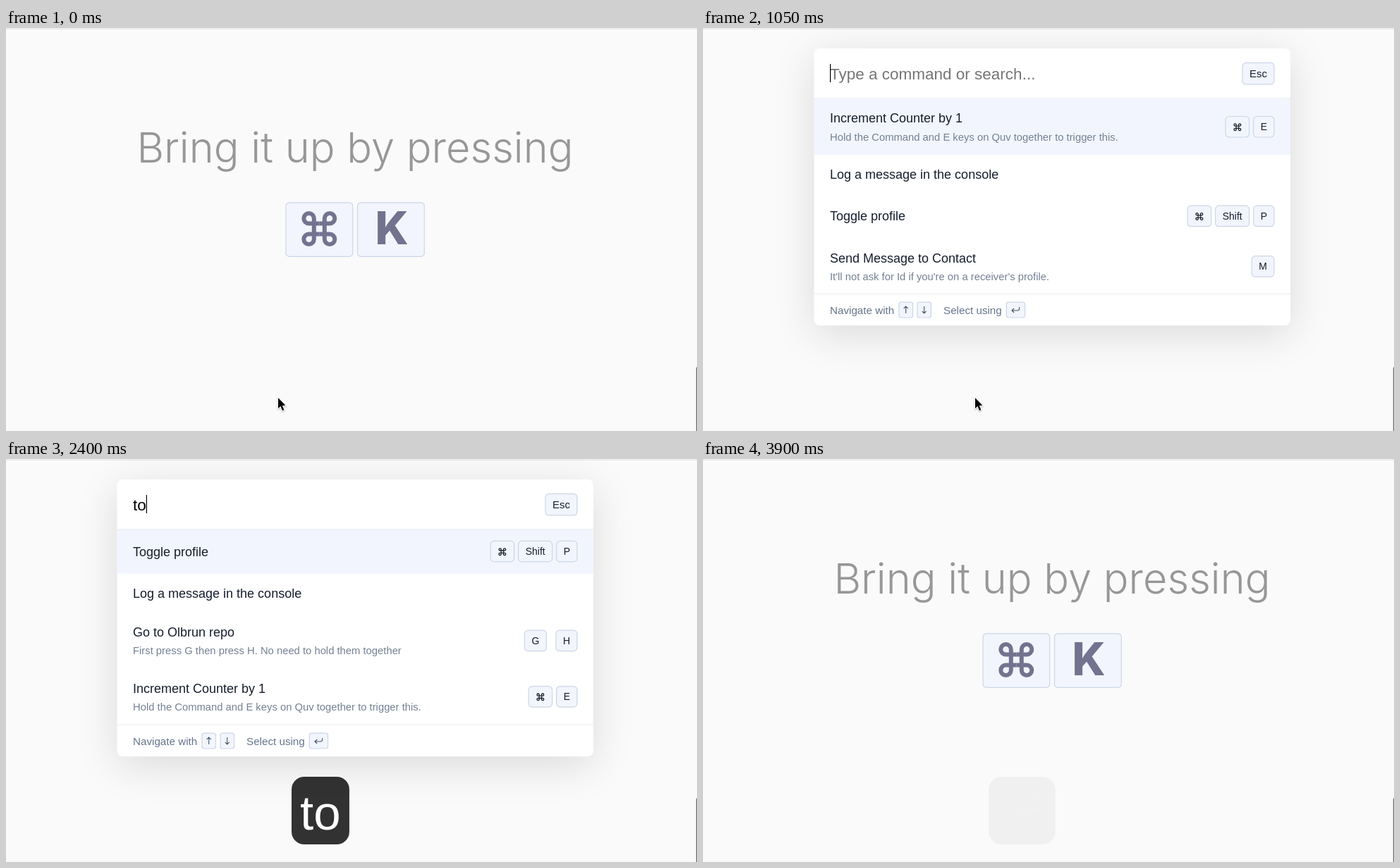
An HTML page with a canvas that plays this animation: 980 px wide and 572 px high, repeating every 4.12 s.

```html
<!DOCTYPE html>
<html lang="en">
<head>
<meta charset="utf-8">
<title>Command palette</title>
<style>
html, body { margin: 0; width: 100%; height: 100%; overflow: hidden; background: #fafafa; }
canvas { display: block; width: 980px; height: 572px; }
</style>
</head>
<body>
<canvas id="stage"></canvas>
<script>
const W = 980, H = 572, LOOP = 4120, STEP = 50;
const SANS = '"Liberation Sans", Arial, sans-serif';
const INTER = 'Inter, "Open Sans", sans-serif';
const INK = '#161d2d', KEY = '#f2f5fd', EDGE = '#ccd6e7', MUTED = '#64748b';
const dpr = window.devicePixelRatio || 1;

function setup(canvas) {
  canvas.width = W * dpr;
  canvas.height = H * dpr;
  const c = canvas.getContext('2d');
  c.scale(dpr, dpr);
  return c;
}
const stage = setup(document.getElementById('stage'));
const layer = document.createElement('canvas');
const pane = setup(layer);

// ---- drawing helpers ----
function box(c, x, y, w, h, r, fill, line) {
  c.beginPath();
  c.roundRect(x, y, w, h, r);
  c.fillStyle = fill;
  c.fill();
  if (line) {
    c.strokeStyle = line;
    c.lineWidth = 1.2;
    c.stroke();
  }
}

// y is the middle of the capital letters
function label(c, str, x, y, size, color, align = 'left', font = SANS, weight = 400) {
  c.font = `${weight} ${size}px ${font}`;
  c.textAlign = align;
  c.fillStyle = color;
  c.fillText(str, x, y + size * 0.36);
}

function poly(c, points, fill) {
  c.beginPath();
  points.forEach(([x, y]) => c.lineTo(x, y));
  c.closePath();
  c.fillStyle = fill;
  c.fill();
}

function command(c, x, y, size, lw, color) {
  const half = (size - lw) / 2, s = half * 0.34, r = (half - s) / 2;
  c.strokeStyle = color;
  c.lineWidth = lw;
  for (const [sx, sy] of [[1, 1], [-1, 1], [1, -1], [-1, -1]]) {
    c.save();
    c.translate(x, y);
    c.scale(sx, sy);
    c.beginPath();
    c.moveTo(s, 0);
    c.lineTo(s, s + r);
    c.arc(s + r, s + r, r, Math.PI, -Math.PI / 2, true);
    c.lineTo(0, s);
    c.stroke();
    c.restore();
  }
}

// right-aligned key cap, returns its left edge
function keycap(c, name, right, mid, h = 29.5, size = 14) {
  c.font = `400 ${size}px ${SANS}`;
  const w = name === 'cmd' ? 33.5 : c.measureText(name).width + 20;
  box(c, right - w, mid - h / 2, w, h, 5, KEY, EDGE);
  if (name === 'cmd') command(c, right - w / 2, mid + 0.5, 11, 1.3, INK);
  else label(c, name, right - w / 2, mid, size, INK, 'center');
  return right - w;
}

// ---- page behind the palette ----
function drawPage(c) {
  c.fillStyle = '#fafafa';
  c.fillRect(0, 0, W, H);
  c.fillStyle = '#f3f3f3';
  c.fillRect(0, 0, W, 1);
  c.fillStyle = '#e6e6e6';
  c.fillRect(0, 1, W, 1);
  box(c, 978.8, 480, 20, 120, 4, '#6c6c6c');
  label(c, 'Bring it up by pressing', 495, 169.5, 59.5, '#979797', 'center', INTER, 300);
  box(c, 397, 247.8, 94.8, 76.6, 5, KEY, EDGE);
  box(c, 498.5, 247.8, 94.8, 76.6, 5, KEY, EDGE);
  command(c, 444.3, 285, 50, 6, '#73738f');
  label(c, 'K', 547, 283.5, 64, '#73738f', 'center', INTER, 800);
}

function drawPointer(c) {
  c.save();
  c.translate(386, 525);
  c.beginPath();
  [[0, 0], [0, 15], [3.4, 11.8], [6, 18], [8.4, 17], [5.8, 11], [10.4, 10.6]]
    .forEach(([x, y]) => c.lineTo(x, y));
  c.closePath();
  c.shadowColor = 'rgba(0,0,0,.3)';
  c.shadowBlur = 2 * dpr;
  c.shadowOffsetY = dpr;
  c.strokeStyle = '#fff';
  c.lineWidth = 2;
  c.stroke();
  c.shadowColor = 'transparent';
  c.fillStyle = '#000';
  c.fill();
  c.restore();
}

// ---- palette ----
const ROWS = {
  count: { title: 'Increment Counter by 1', sub: 'Hold the Command and E keys on Quv together to trigger this.', keys: ['cmd', 'E'], h: 79.5 },
  log: { title: 'Log a message in the console', keys: [], h: 55.3 },
  toggle: { title: 'Toggle profile', keys: ['cmd', 'Shift', 'P'], h: 63.3 },
  send: { title: 'Send Message to Contact', sub: "It'll not ask for Id if you're on a receiver's profile.", keys: ['M'], h: 79.5 },
  repo: { title: 'Go to Olbrun repo', sub: 'First press G then press H. No need to hold them together', keys: ['G', 'H'], gap: 13.5, h: 79.5 }
};
const ALL = ['count', 'log', 'toggle', 'send', 'repo'];
const FOUND = ['toggle', 'log', 'repo', 'count', 'send'];
const PRESS = [1350, 1450, 1600, 1700];
const TYPE = [2350, 2400, 2450, 2550, 2600];
const passed = (times, t) => times.filter(v => t >= v).length;
const typed = t => 'toglg'.slice(0, passed(TYPE, t));

function scrollAt(t) {
  if (t < 1600) return 0;
  if (t < 1700 || t >= 2350) return 1;
  const p = Math.min(1, (t - 1650) / 200);
  return 1 + 79.6 * (1 - (1 - p) ** 2);
}

function caretOn(t) {
  const off = [[400, 600], [850, 1050], [2800, 3000], [3300, LOOP]];
  return !off.some(([a, b]) => t >= a && t < b);
}

function drawRow(c, row, y, active) {
  const mid = y + row.h / 2;
  if (active) {
    c.fillStyle = KEY;
    c.fillRect(157.5, y, 675.5, row.h);
  }
  label(c, row.title, 180, row.sub ? mid - 12.3 : mid, 18, INK);
  if (row.sub) label(c, row.sub, 180, mid + 14.3, 14.8, '#748094');
  let right = 810;
  for (const k of [...row.keys].reverse()) right = keycap(c, k, right, mid) - (row.gap || 6);
}

function drawList(c, t) {
  const order = t < 2400 ? ALL : FOUND, scroll = scrollAt(t);
  const active = t < 2350 ? passed(PRESS, t) : 0;
  c.save();
  c.beginPath();
  c.rect(157, 100, 677, 277);
  c.clip();
  let y = 100.5 - scroll;
  order.forEach((id, i) => {
    drawRow(c, ROWS[id], y, i === active);
    y += ROWS[id].h;
  });
  const bar = t < 1600 || t >= 2200 ? 0 : t < 2100 ? 1 : t < 2150 ? 0.8 : 0.4;
  if (bar) box(c, 822.8, 103 + (scroll - 1) / 79.6 * 62, 7.7, 209.5, 3.8, `rgba(0,0,0,${bar * 0.5})`);
  c.restore();
}

function drawFooter(c) {
  label(c, 'Navigate with', 180, 400.3, 15.2, MUTED);
  label(c, 'Select using', 341, 400.3, 15.2, MUTED);
  for (const [x, w] of [[278, 19.5], [304, 19.5], [430.3, 26.2]]) box(c, x, 389.2, w, 21.8, 3, KEY, EDGE);
  c.strokeStyle = '#465468';
  c.lineWidth = 1.1;
  c.beginPath();
  for (const [x, dir] of [[287.7, 1], [313.7, -1]]) {
    const tip = 400 - dir * 5;
    c.moveTo(x, 400 + dir * 5);
    c.lineTo(x, tip);
    c.moveTo(x - 3, tip + dir * 3.2);
    c.lineTo(x, tip);
    c.lineTo(x + 3, tip + dir * 3.2);
  }
  c.moveTo(448.7, 396);
  c.lineTo(448.7, 398);
  c.quadraticCurveTo(448.7, 401, 445.5, 401);
  c.lineTo(438, 401);
  c.moveTo(441.2, 398);
  c.lineTo(438, 401);
  c.lineTo(441.2, 404);
  c.stroke();
}

function drawPalette(c, t) {
  c.clearRect(0, 0, W, H);
  c.save();
  c.shadowColor = 'rgba(0,0,0,.13)';
  c.shadowBlur = 58 * dpr;
  c.shadowOffsetY = 12 * dpr;
  box(c, 157.5, 29, 675.5, 393.3, 8, '#fff');
  c.restore();
  const text = typed(t);
  label(c, text || 'Type a command or search...', 180, 64.5, 22.5, text ? '#000' : '#757575');
  if (caretOn(t)) {
    const x = text ? 180 + c.measureText(text).width : 180;
    c.fillStyle = '#000';
    c.fillRect(x, 51, 1.2, 26);
  }
  keycap(c, 'Esc', 810, 64.7, 30.5, 15);
  drawList(c, t);
  c.fillStyle = '#e8ebf0';
  c.fillRect(157.5, 99.5, 675.5, 1);
  c.fillRect(157.5, 376.7, 675.5, 1);
  drawFooter(c);
}

// opacity, vertical shift and horizontal scale of the palette
function pose(t) {
  if (t < 100 || t >= 3500) return null;
  if (t < 150) return [0.45, 5, 0.975];
  if (t < 200) return [0.9, -3, 1];
  if (t < 3400) return [1, 0, 1];
  return t < 3450 ? [0.9, 6, 0.986] : [0.4, 14, 0.965];
}

// ---- keystroke badge ----
const badge = (c, w, h) => box(c, 405, 547 - h, w, h, 18, 'rgba(0,0,0,.8)');

function showCommand(c) {
  badge(c, 132, 96);
  command(c, 448, 501, 52, 5.5, '#fff');
  label(c, 'K', 479, 501, 69, '#fff');
}

function showArrows(c, t) {
  const n = passed(PRESS, t);
  badge(c, 24.8 + 60.5 * n, 85.5);
  for (let i = 0; i < n; i++) {
    const x = 448 + 60.5 * i;
    c.fillStyle = '#fff';
    for (const y of [481, 495.5, 510]) {
      c.beginPath();
      c.arc(x, y, 4.7, 0, Math.PI * 2);
      c.fill();
    }
    poly(c, [[x - 14, 519.5], [x + 14, 519.5], [x, 532.3]], '#fff');
  }
}

function showTyped(c, t) {
  const text = typed(t);
  c.font = `400 69px ${SANS}`;
  badge(c, c.measureText(text).width + 24.4, 96);
  label(c, text, 417, 501.2, 69, '#fff');
}

function showReturn(c) {
  badge(c, 94.8, 96);
  c.strokeStyle = '#fff';
  c.lineWidth = 5.5;
  c.beginPath();
  c.moveTo(463.5, 473.5);
  c.lineTo(465, 473.5);
  c.arc(465, 486.7, 13.2, -Math.PI / 2, Math.PI / 2);
  c.lineTo(439, 499.9);
  c.stroke();
  poly(c, [[424, 499.9], [439, 485], [439, 515]], '#fff');
}

const BADGES = [
  { from: 100, fade: 335, to: 600, show: showCommand },
  { from: 1350, fade: 1950, to: 2350, show: showArrows },
  { from: 2350, fade: 2800, to: 3300, show: showTyped },
  { from: 3300, fade: 3650, to: LOOP, show: showReturn }
];

function drawBadge(c, t) {
  const b = BADGES.find(v => t >= v.from && t < v.to);
  if (!b) return;
  c.globalAlpha = t < b.fade ? 1 : Math.max(0.05, 0.9 - 0.17 * (t - b.fade) / STEP);
  b.show(c, t);
  c.globalAlpha = 1;
}

function draw(t) {
  const c = stage, p = pose(t);
  drawPage(c);
  if (p) {
    const [alpha, dy, sx] = p;
    drawPalette(pane, t);
    c.save();
    c.globalAlpha = alpha;
    c.translate(495.2, dy);
    c.scale(sx, 1);
    c.drawImage(layer, -495.2, 0, W, H);
    c.restore();
  }
  if (t < 1350) drawPointer(c);
  drawBadge(c, t);
}

const start = performance.now();
function tick() {
  const t = (performance.now() - start) % LOOP;
  draw(Math.floor(t / STEP) * STEP);
  requestAnimationFrame(tick);
}
tick();
</script>
</body>
</html>
```
